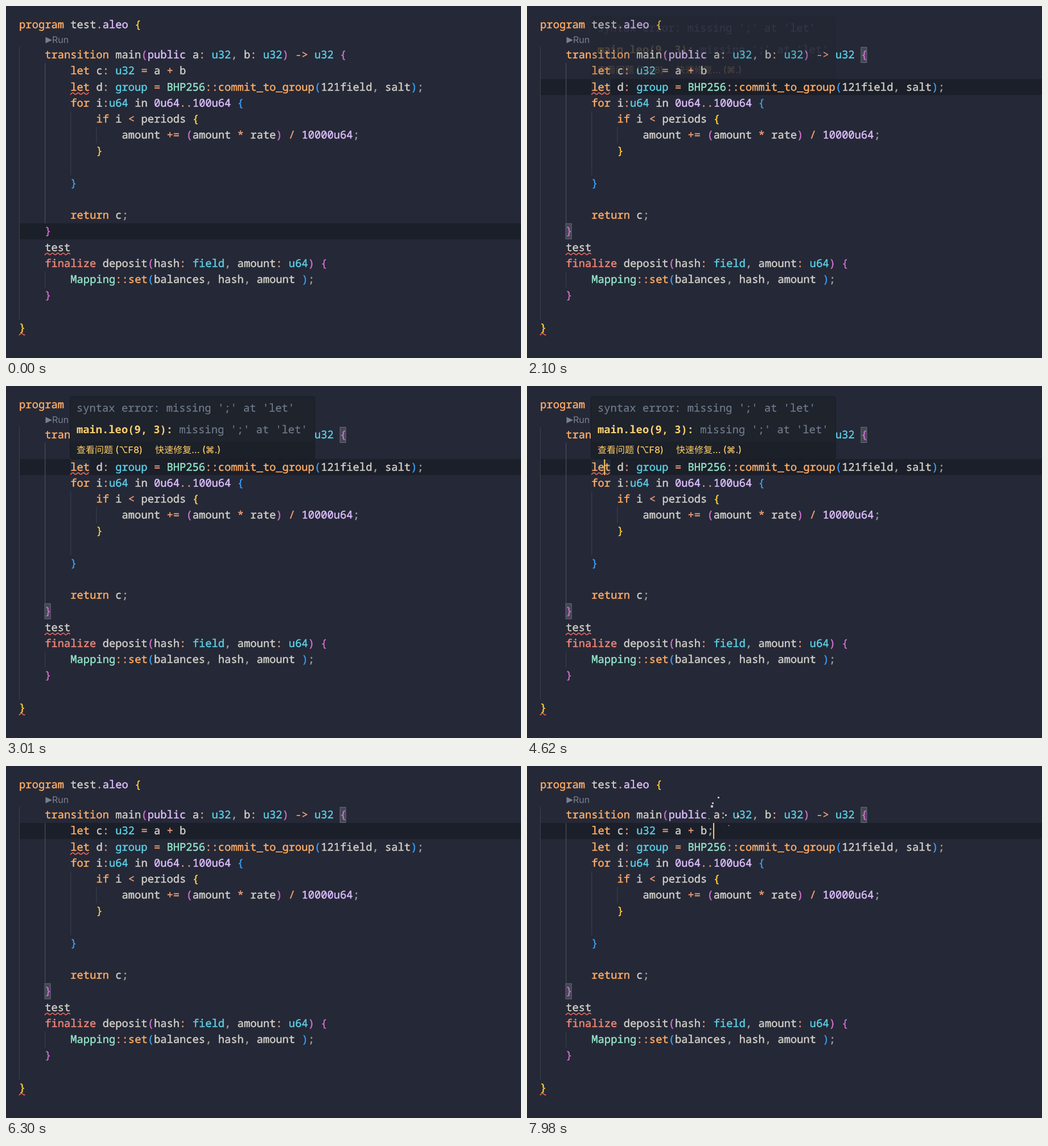
Animation, 905 px wide and 619 px high, one loop 8 s. Source, as an HTML page:

```html
<!DOCTYPE html>
<html lang="zh-CN">
<head>
<meta charset="utf-8">
<title>Editor diagnostics</title>
<style>
  html, body { margin: 0; width: 100%; height: 100%; overflow: hidden; background: #252836; }
  svg { display: block; width: 100vw; height: 100vh; }
  text {
    font: 500 18.8px "Noto Sans Mono", monospace;
    font-variant-ligatures: none;
    text-rendering: geometricPrecision;
    white-space: pre;
    color: #d2d0c8;
  }
  text, tspan { fill: currentColor; stroke: currentColor; stroke-width: 0.45; }
  .keyword { color: #ffad66; }
  .section { color: #f28779; }
  .type { color: #5ccfe6; }
  .constant { color: #dfbfff; }
  .module { color: #95e6cb; }
  .operator { color: #f29e74; }
  .punct { color: #a3a39f; }
  .depth0 { color: #ffd03a; }
  .depth1 { color: #d271d2; }
  .depth2 { color: #3a9ff5; }
  .guide { fill: #3a3f4c; }
  .guide.active { fill: #4b505d; }
  .bracket { fill: #444854; stroke: #686c76; }
  .squiggle { fill: none; stroke: #f0625f; stroke-width: 1.6; }
  .lens { font: 400 16px Inter, sans-serif; color: #788191; stroke: none; }
  .muted { color: #707a8c; stroke-width: 0.25; }
  .location { color: #ffd173; font-weight: 600; stroke: none; }
  .action { font: 500 16px Inter, "Noto Sans CJK SC", "Noto Sans CJK", "DejaVu Sans", sans-serif; color: #ffcc66; stroke: none; }
</style>
</head>
<body>
<svg id="stage" viewBox="0 0 905 619">
  <rect id="rowLight" x="23" width="882" height="28.2" fill="#1b1f29"/>
  <rect id="wordTint" x="113" y="128.4" width="34" height="28.2" fill="#202a38"/>
  <g id="guides"></g>
  <g id="brackets"></g>
  <g id="code"></g>
  <path d="M69.5 54.5L81 60L69.5 65.5Z" fill="#788191"/>
  <text class="lens" x="81" y="65.4">Run</text>
  <text id="semicolon" class="punct">;</text>
  <g id="squiggles"></g>
  <rect id="cursor" width="2" height="28.2" fill="#ffcc66"/>
  <g id="particles" fill="#dcdad0"></g>
  <g id="hover">
    <rect x="112.5" y="18.5" width="430" height="110" rx="4" fill="#1e232c" stroke="#171b24"/>
    <rect x="113" y="98" width="429" height="30" fill="#1b2029"/>
    <text class="muted" x="124" y="44.6">syntax error: missing ';' at 'let'</text>
    <text class="muted" x="124" y="83.4"><tspan class="location">main.leo(9, 3):</tspan> missing ';' at 'let'</text>
    <text class="action" x="124" y="118.4">查看问题 (⌥F8)</text>
    <text class="action" x="262" y="118.4">快速修复... (⌘.)</text>
  </g>
</svg>
<script>
const LOOP = 8000, TICK = 70;
const LEFT = 22.5, CHAR = 11.28, ROW = 28.2;
const TEXT_DX = 0.6, BASELINE = 20.1;
const colX = col => LEFT + col * CHAR;
const rowY = row => row < 0 ? 19.3 : 72 + row * ROW;
const $ = id => document.getElementById(id);

function add(parent, tag, attrs, content = '') {
  const el = document.createElementNS('http://www.w3.org/2000/svg', tag);
  for (const key in attrs) el.setAttribute(key, attrs[key]);
  el.textContent = content;
  return $(parent).appendChild(el);
}
const show = (el, on) => el.setAttribute('visibility', on ? 'visible' : 'hidden');

const source = `program test.aleo {
    transition main(public a: u32, b: u32) -> u32 {
        let c: u32 = a + b
        let d: group = BHP256::commit_to_group(121field, salt);
        for i:u64 in 0u64..100u64 {
            if i < periods {
                amount += (amount * rate) / 10000u64;
            }

        }

        return c;
    }
    test
    finalize deposit(hash: field, amount: u64) {
        Mapping::set(balances, hash, amount );
    }

}`;

const grammar = [
  ['keyword', /^(program|transition|let|for|if|return|commit_to_group|set)$/],
  ['section', /^finalize$/],
  ['type', /^(u32|u64|group|field)$/],
  ['constant', /^(public|aleo|\d+u64)$/],
  ['module', /^(BHP256|Mapping)$/],
  ['punct', /^[,;]$/],
  ['operator', /^[^\w\s]+$/]
];

let depth = 0;
function tokenClass(token) {
  if (/[({]/.test(token)) return 'depth' + depth++ % 3;
  if (/[)}]/.test(token)) return 'depth' + --depth % 3;
  const rule = grammar.find(([, pattern]) => pattern.test(token));
  return rule ? rule[0] : '';
}

// Each token is placed on the character grid.
source.split('\n').forEach((line, i) => {
  for (const match of line.matchAll(/\w+|[(){},;]|[^\w\s(){},;]+/g)) {
    const x = colX(match.index) + TEXT_DX, y = rowY(i - 1) + BASELINE;
    add('code', 'text', { class: tokenClass(match[0]), x, y }, match[0]);
  }
});

function guide(col, from, to, active = '') {
  add('guides', 'rect', { class: 'guide ' + active, x: colX(col) + 0.4, y: rowY(from), width: 1.2, height: (to - from) * ROW });
}
guide(0, 0, 17);
guide(4, 1, 11, 'active');
guide(4, 14, 15);
guide(8, 4, 8);
guide(12, 5, 6);

for (const [col, row] of [[50, 0], [4, 11]]) {
  add('brackets', 'rect', { class: 'bracket', x: colX(col) + 0.5, y: rowY(row) + 0.5, width: 10, height: 27 });
}

function squiggle(col, row, chars) {
  const x = colX(col), y = rowY(row) + 25.6, end = chars * CHAR;
  let d = '';
  for (let dx = 0; dx <= end; dx++) {
    d += `${dx ? 'L' : 'M'}${x + dx} ${y + 1.5 * Math.cos(dx * 2 * Math.PI / 9.4)}`;
  }
  return add('squiggles', 'path', { class: 'squiggle', d });
}
const letError = squiggle(8, 2, 3);
squiggle(4, 12, 4);
squiggle(0, 17, 1);

$('semicolon').setAttribute('x', colX(26) + TEXT_DX);
$('semicolon').setAttribute('y', rowY(1) + BASELINE);

// Sparks: offset from the caret after 210 ms, and size.
const sparks = [[8, -49, 3], [-2, -39, 3], [-4, -34, 4], [21, -18, 3], [43, -16, 3], [-8, -11, 1.5], [27, 1, 1.5]]
  .map(([dx, dy, size]) => ({ dx, dy, el: add('particles', 'rect', { width: size, height: size }) }));
const SPARK_LIFE = 560, GRAVITY = 12;

function drawSparks(age, spread) {
  const alive = age >= 0 && age < SPARK_LIFE;
  show($('particles'), alive);
  if (!alive) return;
  const s = age / 210;
  $('particles').setAttribute('opacity', 1 - (age / SPARK_LIFE) ** 2);
  for (const { dx, dy, el } of sparks) {
    el.setAttribute('x', 327 + dx * s * spread);
    el.setAttribute('y', 103 + dy * s * Math.sqrt(spread) + GRAVITY * (s * s - s));
  }
}

const CLICK = 1470, HOVER_IN = 2100, HOVER_OUT = 5040, MOVE = 5810, TYPE = 6720, BURST = 7770;
const blinks = [CLICK, 1960, 2520, 3010, 3570, 4060, 4620, 5110, 5670, 6300, TYPE, 7280, BURST];
const hoverLevels = [0.17, 0.5, 0.82, 1];

function draw(t) {
  const row = t < CLICK ? 11 : t < MOVE ? 2 : 1;
  const col = t < MOVE ? 10 : t < TYPE ? 26 : 27;
  const hovering = t >= HOVER_IN && t < HOVER_OUT;

  $('rowLight').setAttribute('y', rowY(row));
  $('cursor').setAttribute('x', colX(col));
  $('cursor').setAttribute('y', rowY(row));
  show($('cursor'), blinks.filter(b => b <= t).length % 2);
  show($('brackets'), t >= CLICK + TICK);
  show($('wordTint'), hovering);
  show($('hover'), hovering);
  $('hover').setAttribute('opacity', hoverLevels[Math.floor((t - HOVER_IN) / TICK)] ?? 1);
  show($('semicolon'), t >= TYPE);
  show(letError, t < 7140);
  if (t < BURST) drawSparks(t - TYPE, 0.35);
  else drawSparks(t - BURST, 1);
}

let start;
function frame(now) {
  start ??= now;
  const t = (now - start) % LOOP;
  draw(Math.floor(t / TICK) * TICK);
  requestAnimationFrame(frame);
}
draw(0);
requestAnimationFrame(frame);
</script>
</body>
</html>
```
